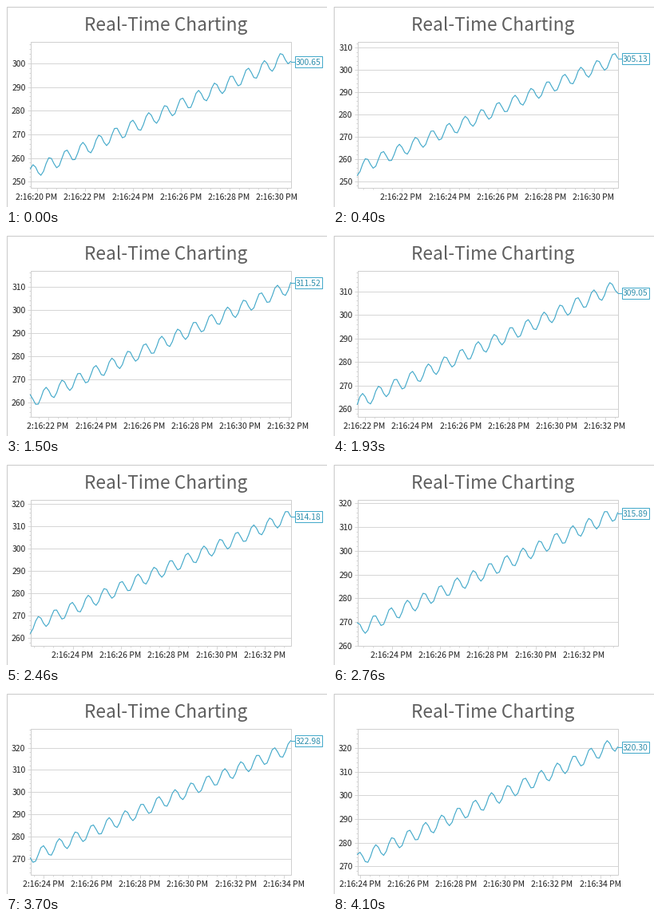
A matplotlib script that plays this animation: 402 by 252 pixels, repeating every 4.16 s.

```python
import math

import matplotlib.pyplot as plt
import numpy as np
from matplotlib.animation import FuncAnimation
from matplotlib.collections import LineCollection
from matplotlib.patches import Rectangle

WIDTH, HEIGHT, DPI = 402, 252, 96
LOOP_MS, TICK_MS = 4160, 10
LEFT, RIGHT, TOP, BOTTOM = 30.5, 356.5, 44.5, 227.5
PX = 72 / DPI
FONT = "Noto Sans CJK JP"

POINTS = 100            # samples visible at once
FIRST_SAMPLE = 596      # newest sample when the loop starts
SAMPLE_S = 0.1094       # seconds between samples
START_S = 30.57         # seconds past 2:16 at the right edge

LINE, TEAL, INK = "#43a9ca", "#2f8fad", "#1f1f1f"
GRID, BORDER = "#d6d6d6", "#c9c9c9"

# Uneven moments at which a new sample arrives
ARRIVALS = np.array([
    60, 160, *range(300, 801, 100), *range(960, 1361, 100), 1500, 1560,
    1730, 1830, 1930, 2060, 2130, 2230, 2360, 2460, 2600, 2660, 2760,
    2930, 3030, 3130, 3230, 3360, 3430, 3560, *range(3700, 4101, 100)])


def signal(n):
    return 5 + n / 2 + 3 * np.sin(n)


def multiples(low, high, step):
    return range(math.ceil(low / step) * step, math.floor(high / step) * step + 1, step)


def pixel(v):
    return math.floor(v) + 0.5


fig = plt.figure(figsize=(WIDTH / DPI, HEIGHT / DPI), dpi=DPI, facecolor="white")
ax = fig.add_axes([0, 0, 1, 1])
ax.set_xlim(0, WIDTH)
ax.set_ylim(HEIGHT, 0)
ax.axis("off")


def label(x, y, size, color=INK, ha="center"):
    return ax.text(x, y, "", fontsize=size * PX, color=color, ha=ha,
                   va="baseline", family=FONT)


def box(x0, y0, x1, y1, color, **kw):
    return ax.add_patch(Rectangle((x0, y0), x1 - x0, y1 - y0, fill=False,
                                  edgecolor=color, linewidth=PX, **kw))


box(0.5, 0.5, WIDTH - 0.5, HEIGHT - 0.5, BORDER)
label(200.5, 31, 22.7, "#5f5f5f").set_text("Real-Time Charting")

grid = ax.add_collection(LineCollection([], colors=GRID, linewidths=PX, zorder=1))
box(LEFT, TOP, RIGHT, BOTTOM, "#cfcfcf", zorder=1.5)
curve, = ax.plot([], [], color=LINE, linewidth=1.15 * PX, zorder=3)
leader, = ax.plot([], [], color=LINE, linewidth=PX, zorder=3)
tag = box(361.5, 0, 395.5, 14, LINE, zorder=3)
tag_text = label(378.5, 0, 10.4, TEAL)
x_labels = [label(0, 243, 10.4) for _ in range(7)]
y_labels = [label(24.5, 0, 10.4, ha="right") for _ in range(8)]


def place(labels, entries):
    entries = list(entries)
    for i, text in enumerate(labels):
        text.set_visible(i < len(entries))
        if i < len(entries):
            x, y, s = entries[i]
            text.set_position((x, y))
            text.set_text(s)


def draw(frame):
    step = int(np.searchsorted(ARRIVALS, frame * TICK_MS, side="right"))
    last = FIRST_SAMPLE + step
    values = signal(np.arange(last - POINTS + 1, last + 1))

    margin = 0.1 * np.ptp(values)
    low, high = values.min() - margin, values.max() + margin
    end = START_S + step * SAMPLE_S
    span = (POINTS - 1) * SAMPLE_S

    def to_x(seconds):
        return RIGHT - (end - seconds) * (RIGHT - LEFT) / span

    def to_y(value):
        return BOTTOM - (value - low) * (BOTTOM - TOP) / (high - low)

    curve.set_data(np.linspace(LEFT, RIGHT, POINTS), to_y(values))

    segments = []
    for v in multiples(low, high, 2):
        y = pixel(to_y(v))
        major = v % 10 == 0
        segments.append([(LEFT - (4 if major else 2), y), (RIGHT if major else LEFT, y)])
    for tenths in multiples(10 * (end - span), 10 * end, 4):
        x = pixel(to_x(tenths / 10))
        segments.append([(x, BOTTOM), (x, BOTTOM + (4 if tenths % 20 == 0 else 2))])
    grid.set_segments(segments)

    place(y_labels, ((24.5, pixel(to_y(v)) + 4.5, str(v))
                     for v in multiples(low, high, 10)))
    place(x_labels, ((to_x(s), 243, f"2:16:{s:02d} PM")
                     for s in multiples(end - span, end, 2)))

    y = pixel(to_y(values[-1]))
    leader.set_data([RIGHT, 361.5], [y, y])
    tag.set_y(y - 7)
    tag_text.set_position((378.5, y + 4))
    tag_text.set_text(f"{values[-1]:.2f}")
    return []


animation = FuncAnimation(fig, draw, frames=LOOP_MS // TICK_MS, interval=TICK_MS,
                          repeat=True, repeat_delay=0, init_func=lambda: draw(0))
plt.show()
```
